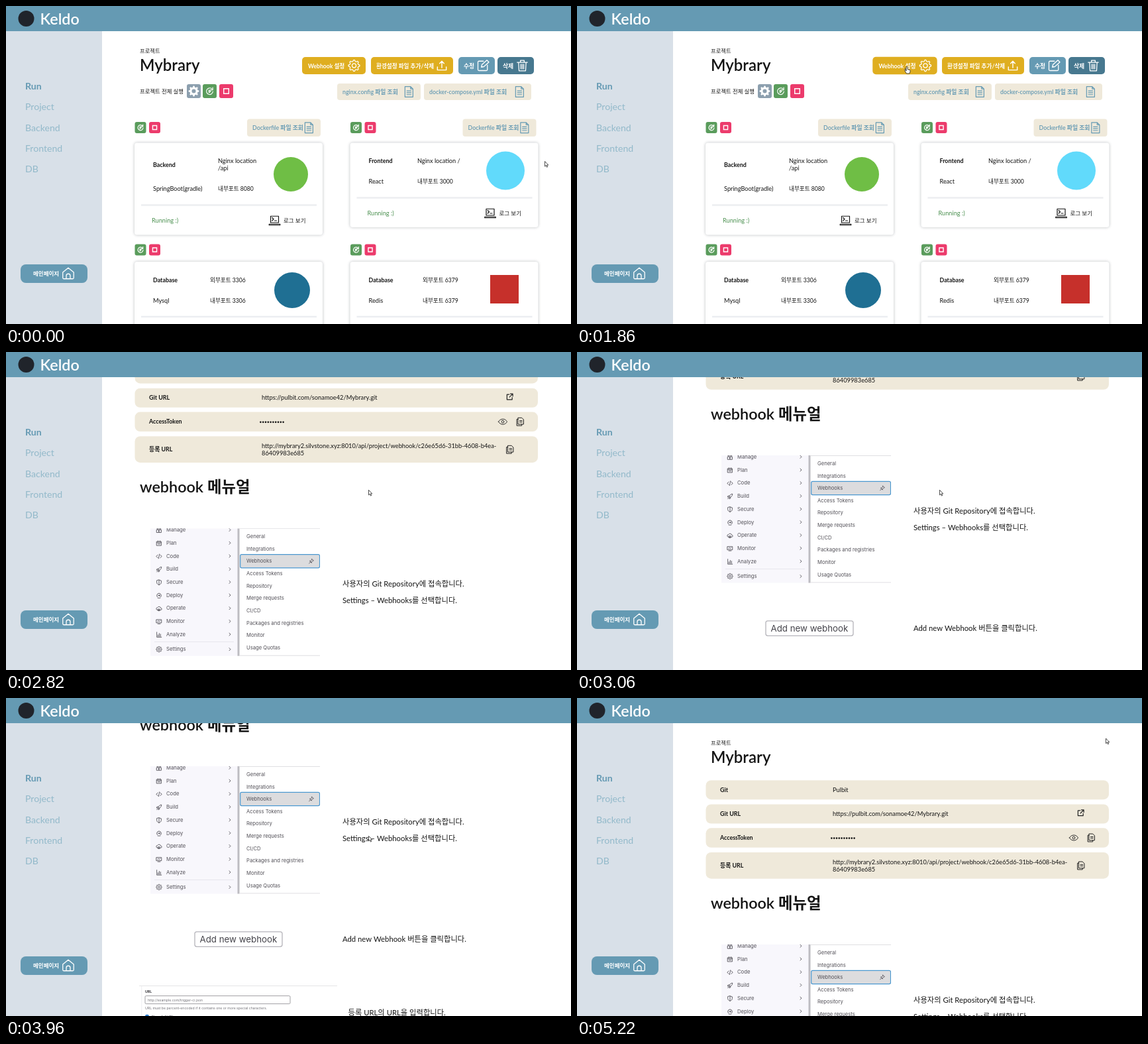
An HTML page with a canvas for the animation above (5.28 s loop, 853 by 480 pixels).

```html
<!DOCTYPE html>
<html lang="ko">
<head>
<meta charset="utf-8">
<title>Webhook</title>
<style>
html, body { margin: 0; width: 100%; height: 100%; overflow: hidden; background: #fff; }
canvas { display: block; width: 853px; height: 480px; }
</style>
</head>
<body>
<canvas id="c"></canvas>
<script>
const W = 853, H = 480, LOOP = 5280, OPEN_AT = 1980;
const cv = document.getElementById('c'), g = cv.getContext('2d');
const dpr = window.devicePixelRatio || 1;
cv.width = Math.round(W * dpr);
cv.height = Math.round(H * dpr);

const BLUE = '#659ab3', DEEP = '#47788f', GOLD = '#dfae20', SAND = '#efe9da', INK = '#151515';
const GREEN = '#5a9c5c', PINK = '#ec3b6c', GRAY = '#535158', WHITE = '#fff';
const MAIN = 'Lato, "Noto Sans CJK KR", "Noto Sans CJK", sans-serif';
const UI = 'Inter, "Liberation Sans", sans-serif';
const MONO = '"DejaVu Sans Mono", monospace';

const ICON = {
  reload: 'M18 5.5A9 9 0 1 0 21 13M20.5 2v6.5H14M10 9l5 3.5-5 3.5z',
  doc: 'M4 1h12l5 5v17H4zM16 1v5h5M8 10h9M8 14h9M8 18h9',
  home: 'M1 10L12 1l11 9v11a2 2 0 0 1-2 2H3a2 2 0 0 1-2-2zM8 23v-6a4 4 0 0 1 8 0v6',
  upload: 'M2 15v7h20v-7M12 17V2M7 7l5-5 5 5',
  edit: 'M13 3H4a2 2 0 0 0-2 2v15a2 2 0 0 0 2 2h15a2 2 0 0 0 2-2v-9M9 15l1-5L20 1l4 4-10 9z',
  trash: 'M1 5h22M8 5V1h8v4M4 5l1 18h14l1-18M9 9v10M12 9v10M15 9v10',
  laptop: 'M4 3h16v13H4zM1 19h22v2H1zM7 6l3 3-3 3M12 12h4',
  link: 'M10 4H3v17h17v-7M14 2h8v8M22 2L11 13',
  eye: 'M0 12c5-10 19-10 24 0-5 10-19 10-24 0zM15.5 12a3.5 3.5 0 1 1-7 0 3.5 3.5 0 0 1 7 0',
  copy: 'M7 1h10l5 5v13H7zM7 5H3v18h14v-4M11 9h7M11 13h7',
  chev: 'M8 4l8 8-8 8',
  pin: 'M14 3l7 7-4 1-4 4v4L5 11h4l4-4zM9 15l-6 6'
};

// Side menu of the manual picture: label and small outline icon
const MENU = [
  ['Manage', 'M3 10h8v11H3zM13 10h8v11h-8zM5 3h4v4H5zM15 3h4v4h-4z'],
  ['Plan', 'M3 5h18v16H3zM3 10h18M8 2v5M16 2v5M8 15h8'],
  ['Code', 'M7 6l-6 6 6 6M17 6l6 6-6 6M14 3l-4 18'],
  ['Build', 'M9 15c0-7 5-12 13-13 0 8-5 13-12 14zM9 10H4l-2 5h5M14 16v4l-5 2v-5M3 22l3-3'],
  ['Secure', 'M12 2l9 3v7c0 5-4 8-9 10-5-2-9-5-9-10V5zM12 2v20'],
  ['Deploy', 'M5 18a9 9 0 1 1 14 0M8 12h8M13 9l3 3-3 3M7 22h10'],
  ['Operate', 'M6 18a5 5 0 0 1 0-10 7 7 0 0 1 13 2 4 4 0 0 1 0 8zM9 14h6v7H9z'],
  ['Monitor', 'M2 4h20v13H2zM7 21h10M6 12l4-4 3 4 4-4'],
  ['Analyze', 'M3 2v20h19M8 19v-6M13 19V7M18 19v-9']
];
const SUBMENU = ['General', 'Integrations', 'Webhooks', 'Access Tokens', 'Repository',
  'Merge requests', 'CI/CD', 'Packages and registries', 'Monitor', 'Usage Quotas'];

let mouse = { x: 0, y: 0, hand: false };

function text(s, x, y, size, color = INK, weight = 400, family = MAIN) {
  g.font = `${weight} ${size}px ${family}`;
  g.fillStyle = color;
  g.fillText(s, x, y);
}

function box(x, y, w, h, r, fill, line, lw = 1) {
  g.beginPath();
  g.roundRect(x, y, w, h, r);
  if (fill) { g.fillStyle = fill; g.fill(); }
  if (line) { g.strokeStyle = line; g.lineWidth = lw; g.stroke(); }
}

function disc(x, y, r, fill, line, lw = 1) {
  g.beginPath();
  g.arc(x, y, r, 0, Math.PI * 2);
  if (fill) { g.fillStyle = fill; g.fill(); }
  if (line) { g.strokeStyle = line; g.lineWidth = lw; g.stroke(); }
}

// Icons live on a 24 unit grid and are centred on x, y
function icon(d, x, y, size, color, lw = 1.2) {
  const k = size / 24;
  g.save();
  g.translate(x - size / 2, y - size / 2);
  g.scale(k, k);
  g.strokeStyle = color;
  g.lineWidth = lw / k;
  g.lineJoin = g.lineCap = 'round';
  g.stroke(new Path2D(d));
  g.restore();
}

function gear(x, y, r, color, solid, lw = 1.2) {
  g.beginPath();
  for (let i = 0; i < 32; i++) {
    const a = (i - .5) * Math.PI / 16, q = i % 4 < 2 ? r : r * .76;
    g.lineTo(x + q * Math.cos(a), y + q * Math.sin(a));
  }
  g.closePath();
  g.lineJoin = 'round';
  if (solid) {
    g.moveTo(x + r * .38, y);
    g.arc(x, y, r * .38, 0, Math.PI * 2);
    g.fillStyle = color;
    g.fill('evenodd');
  } else {
    g.strokeStyle = color;
    g.lineWidth = lw;
    g.stroke();
    disc(x, y, r * .36, null, color, lw);
  }
}

// A button grows slightly under the pointer
function button(x, y, w, h, color, r, draw) {
  const over = mouse.x >= x && mouse.x <= x + w && mouse.y >= y && mouse.y <= y + h;
  g.save();
  if (over) {
    mouse.hand = true;
    g.translate(x + w / 2, y + h / 2);
    g.scale(1.015, 1.015);
    g.translate(-x - w / 2, -y - h / 2);
  }
  box(x, y, w, h, r, color);
  draw();
  g.restore();
}

function fileButton(label, x, y, w, h) {
  button(x, y, w, h, SAND, 4, () => {
    text(label, x + 8, y + h / 2 + 3.5, 8.8, BLUE, 600);
    icon(ICON.doc, x + w - 18, y + h / 2, 17, BLUE, 1.2);
  });
}

function runButtons(x, y, s, gap) {
  button(x, y, s, s, GREEN, 3, () => icon(ICON.reload, x + s / 2, y + s / 2, s * .62, WHITE, 1.2));
  const px = x + gap, q = s * .36;
  button(px, y, s, s, PINK, 3, () =>
    box(px + (s - q) / 2, y + (s - q) / 2, q, q, 0, null, WHITE, 1.4));
}

function card(x, y, w, h, line, c) {
  g.save();
  g.shadowColor = 'rgba(40,50,60,.32)';
  g.shadowBlur = 4 * dpr;
  box(x, y, w, h, 4, WHITE);
  g.restore();
  box(x + 10, line - 1.2, w - 19, 2.4, 0, '#eceef1');
  text(c.kind, x + 28, c.y1, 8.9, INK, 700);
  text(c.tool, x + 28, c.y2, 9.2);
  c.top.forEach((s, i) => text(s, c.x2, c.yt + i * 11, c.ts));
  text(c.port, c.x2, c.y2, 8.6);
  text('Running :)', x + 26, line + 26, 9.2, '#4b9050');
  icon(ICON.laptop, x + 211.5, line + 23.5, 18, INK, 1.2);
  text('로그 보기', x + 225, line + 26, 8.5);
}

function heading() {
  text('프로젝트', 202, 71, 8.3, '#222');
  text('Mybrary', 202, 98, 24, INK, 600);
}

function projectPage() {
  heading();
  button(447, 77, 96, 26, GOLD, 5, () => {
    text('Webhook 설정', 456, 93.5, 8.6, WHITE, 700);
    gear(525.5, 90, 8.5, WHITE);
  });
  button(551, 77, 124, 26, GOLD, 5, () => {
    text('환경설정 파일 추가/삭제', 559, 93.5, 8.6, WHITE, 700);
    icon(ICON.upload, 658, 90, 16, WHITE, 1.4);
  });
  button(683, 77, 55, 26, BLUE, 5, () => {
    text('수정', 691, 93.5, 8.8, WHITE, 700);
    icon(ICON.edit, 720, 90, 18, WHITE, 1.3);
  });
  button(742, 77, 55, 26, DEEP, 5, () => {
    text('삭제', 750, 93.5, 8.8, WHITE, 700);
    icon(ICON.trash, 779.5, 90, 17, WHITE, 1.3);
  });

  text('프로젝트 전체 실행', 202, 132, 8.4);
  button(273, 118, 21, 21, '#8c9fae', 3, () => gear(283.5, 128.5, 8, WHITE, true));
  runButtons(297, 118, 21, 25);
  fileButton('nginx.config 파일 조회', 500, 117, 126, 25);
  fileButton('docker-compose.yml 파일 조회', 631, 117, 162, 25);

  for (const x of [194.5, 520]) {
    runButtons(x, 175, 17, 21.5);
    runButtons(x, 359.5, 17, 21.5);
    fileButton('Dockerfile 파일 조회', x + 169.5, 170.5, 111, 26.5);
  }

  card(194, 206.5, 284, 139, 300.5, { kind: 'Backend', tool: 'SpringBoot(gradle)',
    top: ['Nginx location', '/api'], port: '내부포트 8080', x2: 320, y1: 243, y2: 279, yt: 237, ts: 9.2 });
  card(519.5, 206.5, 284, 127.5, 289.5, { kind: 'Frontend', tool: 'React',
    top: ['Nginx location /'], port: '내부포트 3000', x2: 621, y1: 237, y2: 268, yt: 237, ts: 9.2 });
  card(194, 386, 284, 128, 469, { kind: 'Database', tool: 'Mysql',
    top: ['외부포트 3306'], port: '내부포트 3306', x2: 308, y1: 417, y2: 448, yt: 417, ts: 8.6 });
  card(519.5, 386, 284, 128, 469, { kind: 'Database', tool: 'Redis',
    top: ['외부포트 6379'], port: '내부포트 6379', x2: 629, y1: 417, y2: 448, yt: 417, ts: 8.6 });

  disc(430, 254, 26, '#6fbe45');
  disc(754, 248.5, 29, '#61dafb');
  disc(432, 429, 27, '#1f6f93');
  box(731, 406, 43, 43, 0, '#c6302b');
}

function row(y, h, label, value) {
  box(194.5, y, 608.5, h, 8, SAND);
  const base = y + h / 2 + 3.2;
  text(label, 216, base, 8.9, INK, 700);
  if (value) text(value, 386, base, 9.3);
}

function menuPicture() {
  g.save();
  g.beginPath();
  g.rect(218, 372, 256, 192.5);
  g.clip();
  box(218, 372, 132, 193, 0, '#f8f7fc');
  MENU.forEach(([name, d], i) => {
    const y = 374.3 + i * 19.7;
    icon(d, 231, y + .5, 9, GRAY, .9);
    text(name, 242, y + 2.7, 7.7, GRAY, 400, UI);
    icon(ICON.chev, 338, y, 6, GRAY, .9);
  });
  box(224, 543, 120, .7, 0, '#e2e1e8');
  gear(231, 554.5, 4.3, GRAY, false, .9);
  text('Settings', 242, 557.2, 7.7, GRAY, 400, UI);
  icon(ICON.chev, 338, 554.5, 6, GRAY, .9);

  box(349.5, 372, 3, 193, 0, '#bdbcc2');
  box(352.5, 372, 122, .8, 0, '#d5d4d9');
  box(352.5, 563.6, 122, .8, 0, '#d5d4d9');
  box(353.7, 411.4, 119.8, 20.2, 2, '#dcdcde', '#4a97cf', 1.2);
  SUBMENU.forEach((s, i) => text(s, 363, 387 + i * 18.62, 7.65, GRAY, 400, UI));
  icon(ICON.pin, 461, 421.5, 9, GRAY, .9);
  g.restore();
}

function formPicture() {
  const small = (s, x, y, color = '#737278', weight = 400) => text(s, x, y, 5.15, color, weight, UI);
  const dark = '#333238', edge = '#89888d';
  box(201, 703, 299, .8, 0, '#dcdcde');
  box(204.5, 703, .7, 140, 0, '#e6e6e9');
  small('URL', 210, 713.6, dark, 700);
  box(210, 718.6, 219, 12, 1.5, WHITE, edge, .8);
  small('http://example.com/trigger-ci.json', 214, 726.5);
  small('URL must be percent-encoded if it contains one or more special characters.', 210, 739);
  disc(213, 749.8, 2.1, WHITE, '#1f75cb', 2);
  small('Show full URL', 219.5, 751.7, dark);
  disc(213, 759.2, 2.8, WHITE, edge, .7);
  small('Mask portions of URL', 219.5, 761.2, dark);
  small('Do not show sensitive data such as tokens in the UI.', 219.5, 768.8);
  small('Secret token', 210, 779.2, dark, 700);
  box(210, 784.6, 219, 12, 1.5, WHITE, edge, .8);
  small('Used to validate received payloads. Sent with the request in the', 210, 804.8);
  box(376, 799, 45.5, 8.6, 1.5, '#ececef');
  text('X-Gitlab-Token', 378, 804.8, 4.9, dark, 400, MONO);
  small('HTTP header.', 423, 804.8);
  small('Trigger', 210, 819, dark, 700);
  box(210.4, 825, 5.6, 5.6, 1, WHITE, edge, .7);
  small('Push events', 219.5, 829.8, dark);
}

function webhookPage() {
  heading();
  row(124.2, 29, 'Git', 'Pulbit');
  row(160.5, 29, 'Git URL', 'https://pulbit.com/sonamoe42/Mybrary.git');
  row(196.3, 29.5, 'AccessToken');
  row(233, 39.7, '등록 URL');
  for (let i = 0; i < 10; i++) disc(384.4 + i * 3.8, 211.6, 1.3, INK);
  text('http://mybrary2.silvstone.xyz:8010/api/project/webhook/c26e65d6-31bb-4608-b4ea-', 386, 250.5, 9.3);
  text('86409983e685', 386, 262, 9.3);
  icon(ICON.link, 760.5, 173.5, 11, '#222', 1.2);
  icon(ICON.eye, 750, 211, 13, '#333', 1);
  icon(ICON.copy, 776, 211, 13, '#222', 1);
  icon(ICON.copy, 760.5, 253, 13, '#222', 1);
  text('webhook 메뉴얼', 202, 318, 23.4, INK, 600);

  menuPicture();
  text('사용자의 Git Repository에 접속합니다.', 508, 459.7, 11.3);
  text('Settings – Webhooks를 선택합니다.', 508, 484.6, 11.3);

  box(285, 621.8, 132, 22.5, 3, WHITE, '#b5b4ba', 1.3);
  text('Add new webhook', 292.5, 637.7, 13.3, '#45444b', 400, UI);
  text('Add new Webhook 버튼을 클릭합니다.', 508, 637.3, 11.3);

  formPicture();
  text('등록 URL의 URL을 입력합니다.', 516.5, 748.3, 11.3);
  text('AccessToken을 입력합니다.', 516.5, 773, 11.3);
  text('Trigger의 Push Event를 체크합니다.', 516.5, 797.6, 11.3);
}

function frame() {
  box(0, 38, 145, 442, 0, '#d8e0e8');
  box(0, 0, W, 38, 0, BLUE);
  disc(30.5, 19, 12, '#20242b');
  text('Keldo', 51.5, 28, 23.3, WHITE, 600);
  ['Run', 'Project', 'Backend', 'Frontend', 'DB'].forEach((s, i) =>
    text(s, 29, 126 + i * 31.3, 14.1, i ? '#92b9ca' : BLUE, i ? 400 : 700));
  box(22, 390, 101, 28, 8, BLUE);
  text('메인페이지', 41, 407.2, 8.5, WHITE, 700);
  icon(ICON.home, 94, 403.5, 18, WHITE, 1.3);
}

function pointer() {
  g.save();
  g.translate(mouse.x, mouse.y);
  g.lineJoin = 'round';
  g.fillStyle = WHITE;
  g.strokeStyle = '#222';
  g.lineWidth = .8;
  const p = new Path2D(mouse.hand
    ? 'M-1 1Q0-.5 1 1V4.5L4.5 5.5Q5.3 6 5 8L4 11H-.5L-3 7Q-3-.0-1 7Z'
    : 'M0 0V7.6L1.8 6L3 8.8L4.2 8.2L3 5.6H5.3Z');
  g.fill(p);
  g.stroke(p);
  g.restore();
}

const ease = u => u * u * (3 - 2 * u);
const same = u => u;

// Value at time t along [time, value...] points
function along(keys, t, curve) {
  let i = 1;
  while (i < keys.length - 1 && keys[i][0] < t) i++;
  const a = keys[i - 1], b = keys[i];
  const u = curve(Math.min(1, Math.max(0, (t - a[0]) / (b[0] - a[0]))));
  return a.slice(1).map((v, k) => v + (b[k + 1] - v) * u);
}

const PATH = [[0, 813.5, 234.5], [240, 813.5, 234.5], [1140, 633, 125.5], [1260, 633, 125.5],
  [1720, 498, 91], [2080, 498, 91], [2500, 547.5, 208.3], [4620, 547.5, 208.3], [5160, 798.5, 61]];
const SCROLL = [[2590, 0], [2820, 105.3], [3360, 353.3], [3800, 353.3], [4320, 81], [4480, 0]];

function draw(now) {
  const t = now % LOOP;
  const [x, y] = along(PATH, t, ease);
  mouse = { x, y, hand: false };
  g.setTransform(dpr, 0, 0, dpr, 0, 0);
  g.fillStyle = WHITE;
  g.fillRect(0, 0, W, H);
  if (t < OPEN_AT) {
    projectPage();
  } else {
    g.save();
    g.translate(0, -along(SCROLL, t, same)[0]);
    webhookPage();
    g.restore();
  }
  frame();
  pointer();
}

const start = performance.now();
function tick() {
  draw(performance.now() - start);
  requestAnimationFrame(tick);
}
tick();
</script>
</body>
</html>
```
